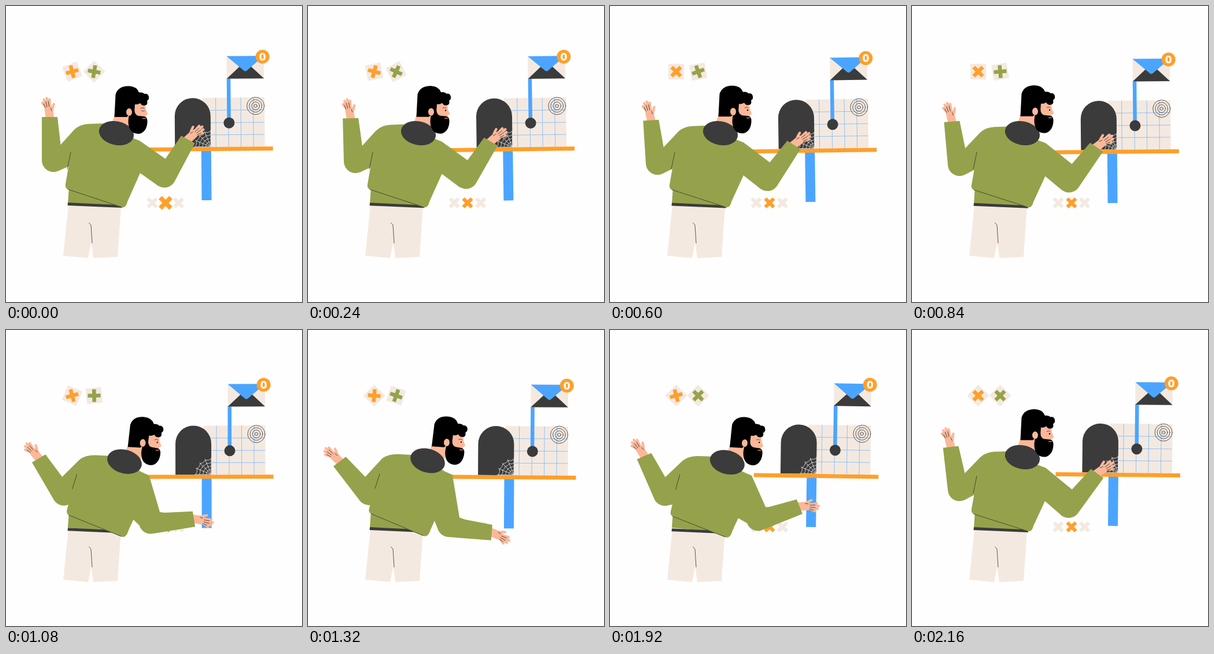
Write an HTML page that moves like this. It is 512 by 512 pixels and loops after 2280 ms.

```html
<!DOCTYPE html>
<html lang="en">
<head>
<meta charset="utf-8">
<title>Empty mailbox</title>
<style>
  html, body { margin: 0; width: 100%; height: 100%; overflow: hidden; background: #fefefe; }
  svg { display: block; width: 100vw; height: 100vh; }
  .green { fill: #95a24b; }
  .dark { fill: #3b3b3b; }
  .beige { fill: #f4e9e0; }
  .blue { fill: #4ba5ff; }
  .orange { fill: #ff9f2b; }
  .skin { fill: #fbb899; }
  .finger { stroke: #fbb899; stroke-width: 4.3; stroke-linecap: round; fill: none; }
  .ink { stroke: #333; stroke-width: .8; fill: none; stroke-linecap: round; }
  .web { stroke: #eee; stroke-width: .8; fill: none; }
  .grid { stroke: #86bff8; stroke-width: .9; fill: none; }
  .badge { font: bold 17px Inter, "Liberation Sans", sans-serif; fill: #fff; stroke: #fff; stroke-width: .7; text-anchor: middle; }
</style>
</head>
<body>
<svg viewBox="0 0 512 512" xmlns="http://www.w3.org/2000/svg">
  <defs>
    <path id="cross" d="M-11-3.3h7.7v-7.7h6.6v7.7H11v6.6H3.3V11h-6.6V3.3H-11z"/>
    <rect id="tile" class="beige" x="-13.5" y="-13.5" width="27" height="27"/>
    <g id="hand">
      <path class="skin" d="M-7 4L-7-12Q-7-19-4-22L4-21Q8-17 7.500-9L7.500 4z"/>
      <path class="finger" d="M-4-17L-9-26M-3-19L-5.500-31M0-20L-.5-33M3-19L4-30M5-10Q8-15 10-21"/>
      <path class="ink" d="M-5-17L-7-24M-2-18L-3-27M1.500-18L1.500-27M5-10L4-15"/>
    </g>
    <path id="forearm" class="green" d="M-20 0V-75H7L12.500-27L20 0A20 20 0 0 1-20 0z"/>
  </defs>

  <g transform="translate(114.500 113.500)">
    <use id="tileL" href="#tile"/><use id="crossL" href="#cross" class="orange"/>
  </g>
  <g transform="translate(152.500 113.500)">
    <use id="tileR" href="#tile"/><use id="crossR" href="#cross" class="green"/>
  </g>

  <use href="#cross" class="beige" transform="translate(253 340.500) rotate(45) scale(.95)"/>
  <use href="#cross" class="beige" transform="translate(298.500 340.500) rotate(45) scale(.95)"/>
  <use id="pulse" href="#cross" class="orange"/>

  <g id="mailbox">
    <rect class="blue" x="338.500" y="257" width="17" height="86"/>
    <rect class="beige" x="341" y="166" width="107.500" height="85"/>
    <path class="grid" d="M364 166V251M386 166V251M407.500 166V251M429 166V251M345 187.500H448M345 209H448M345 230H448"/>
    <path class="dark" d="M293 251V197A31 31 0 0 1 355 197V251z"/>
    <path class="web" id="web"/>
    <rect class="orange" x="247" y="251" width="215.500" height="7"/>
    <g class="ink" id="rings"></g>
    <rect class="blue" x="383.500" y="132" width="6.500" height="72"/>
    <circle class="dark" cx="387" cy="209.500" r="9.500"/>
    <rect class="beige" x="383.500" y="94" width="64.500" height="39"/>
    <path class="dark" d="M383.500 133L415.800 103L448 133z"/>
    <path class="blue" d="M383.500 94H448L418 119.500Q415.800 121 413.500 119.500z"/>
    <circle class="orange" cx="445.700" cy="95.500" r="12"/>
    <text class="badge" x="445.700" y="101.700">0</text>
  </g>

  <path class="beige" d="M108 344L199 347L193 434L151 436L147.500 409L142 436L99 432z"/>
  <path class="ink" d="M143.500 375L147 379L149 410"/>
  <path id="shirt" class="green"/>
  <path id="band" class="dark"/>
  <use id="handL" href="#hand"/>
  <use id="foreL" href="#forearm"/>
  <path id="upperL" class="green"/>
  <use id="handR" href="#hand"/>
  <use id="foreR" href="#forearm"/>
  <path id="upperR" class="green"/>
  <path id="torso" class="green"/>
  <path id="seams" class="ink"/>

  <path id="neck" class="skin" d="M188 188L182 206Q194 214 212 211L212 186z"/>
  <ellipse id="collar" class="dark" rx="30.500" ry="20.500"/>
  <g id="head">
    <path class="skin" d="M208 165L240 164L242 179L245 186Q245 189 242 189L240 200L212 200z"/>
    <path d="M187.500 192L189.500 153Q194 138 213 138.500Q226 139 230 149.500Q238 149 239 152Q246 151 247 157Q248 162 244 164Q246 171 240 172Q235 173 232 168Q228 171 223 170L222 184L216 186L209 192z"/>
    <path d="M213 186L222 180Q223 189 229 190L239 191Q244 192 244.500 198C245 213 237 221.500 228 221C217 220.500 211 212 211.500 198z"/>
    <ellipse class="skin" cx="213" cy="183.500" rx="5" ry="6.500"/>
    <path class="ink" d="M233 177Q236 174.500 239 177"/>
    <path d="M236 194.500H242" stroke="#e0765a" stroke-width="1.500"/>
    <circle id="eye" cx="238" cy="181" r="1.200"/>
    <path id="lid" class="ink" d="M234 181Q237 183 240 181.500"/>
  </g>
</svg>
<script>
const STEP = 120, STEPS = 19;
const el = id => document.getElementById(id);
const set = (id, name, value) => el(id).setAttribute(name, value);
const lerp = (a, b, u) => a + (b - a) * u;
const mix = (a, b, u) => a.map((v, i) => lerp(v, b[i], u));
const ramp = (k, from, to) => Math.min(1, Math.max(0, (k - from) / (to - from)));
const smooth = (k, from, to) => { const u = ramp(k, from, to); return u * u * (3 - 2 * u); };
const easeOut = u => 1 - (1 - u) ** 3;
const wave = (k, peak) => Math.cos(2 * Math.PI * (k - peak) / 23);

function place([x, y, deg], px, py) {
  const a = deg * Math.PI / 180, c = Math.cos(a), s = Math.sin(a);
  return [x + px * c - py * s, y + px * s + py * c];
}

function drawMailbox(k) {
  const sway = wave(k, 15), rise = -3.4 + 3.7 * wave(k, 11.6);
  set('mailbox', 'transform', `translate(${.25 + 1.65 * sway} ${rise}) rotate(${.83 * sway} 355 254.5)`);
}

function drawIcons(k) {
  const spin = (id, deg) => set(id, 'transform', `rotate(${deg})`);
  spin('tileL', -22 + 22 * smooth(k, 0, 4) + 45 * smooth(k, 7, 11));
  spin('crossL', -15 + 60 * smooth(k, 0, 4) + 55 * Math.sin(Math.PI * ramp(k, 7, 18)));
  spin('tileR', 45 + 35 * smooth(k, 0, 4) + 55 * smooth(k, 8, 14));
  spin('crossR', 10 + 75 * smooth(k, 0, 7) + 50 * smooth(k, 8, 14));
  set('pulse', 'transform', `translate(276 340.5) rotate(45) scale(${1.18 - .23 * ramp(k, 0, 2)})`);
}

// dir 1 is the left arm, -1 its mirror image
function drawArm(side, dir, pose, bend, innerY, root, tangent) {
  const [x, y, angle] = pose;
  set('fore' + side, 'transform', `translate(${x} ${y}) rotate(${angle}) scale(${dir} 1)`);
  set('hand' + side, 'transform', `translate(${place(pose, -6.5 * dir, -75)}) rotate(${angle + bend}) scale(${dir} 1)`);
  const outline = [place(pose, 12.5 * dir, innerY), ...root, [x + tangent[0], y + tangent[1]], [x, y]];
  set('upper' + side, 'd', 'M' + outline.join(' ') + 'z');
}

function drawMan(k) {
  const lean = easeOut(ramp(k, 7, 11)) * (1 - smooth(k, 15, 18));
  const swing = lean * lean;
  const slump = ramp(k, 0, 9);
  const dip = 6 * Math.sin(Math.PI * lean);

  // The torso bends more the higher and the further right a point lies.
  const bend = (x, y) => {
    const h = (347 - y) / 140, w = (x - 105) / 125;
    return [x + lean * h * (10 + 13 * w),
            y + lean * (8 * h + 12 * w - 1) + 6.5 * slump * (1 - lean) * h + dip];
  };
  const warp = d => d.replace(/([\d.]+) ([\d.]+)/g, (_, x, y) => bend(+x, +y).map(v => v.toFixed(1)).join(' '));

  set('torso', 'd', warp('M118 214Q127 205 142 204L170 203L218 228L231 233L209 342Q206 350 199 348L107 317Q102 315 103 308L112 255z'));
  const fold = mix([112, 253, 106, 282], [124, 249, 116, 274], lean);
  set('seams', 'd', warp('M107 317L199 347.5') + `M${fold.slice(0, 2)}L${fold.slice(2)}`);

  const hem = 201 - 4 * lean, sag = dip / 2 + slump;
  set('shirt', 'd', `M109 312L107 342L${hem} ${347 + sag}L203 335z`);
  set('band', 'd', `M107 ${340 + sag}L${hem} ${344.5 + sag}V${349 + sag}L106.5 ${345 + sag}z`);

  const armL = mix([82, 267 + 9 * slump, -6.5 * slump], [105.5, 283, -37.5], swing);
  const armR = mix([274 - 3 * slump, 294 + 11 * slump, 28 + 8 * slump], [243.5, 338, 94.5], swing);
  armL[1] += dip;
  armR[1] += dip;
  drawArm('L', 1, armL, -8, -27, [bend(118, 214), [125, lerp(270 + 6 * slump, 302, lean) + dip]], [8, 18.5]);
  const underarm = [lerp(232 - 2 * slump, 219, lean), lerp(289 + 7 * slump, 330, lean) + dip];
  drawArm('R', -1, armR, 19, lerp(-27, -18, lean),
    [bend(231, 233), bend(200, 250), bend(208, 343), underarm], mix([-11, 17], [-20, 4], lean));

  const headY = 10.5 * lean - 1.5 * slump * (1 - lean) + dip;
  for (const id of ['neck', 'head']) {
    set(id, 'transform', `translate(${25.5 * lean} ${headY}) rotate(${4 * lean} 205 205)`);
  }
  set('collar', 'transform', `translate(${191 + 16 * lean} ${220 + 6 * lean + dip}) rotate(${12 + 4 * lean})`);
  set('eye', 'opacity', k < 2 ? 0 : 1);
  set('lid', 'opacity', k < 2 ? 1 : 0);
}

function buildWeb() {
  const spoke = (r, i) => place([355, 250.5, 22.5 * i], -r, 0);
  let d = '';
  for (let i = 0; i < 5; i++) d += `M355 250.5L${spoke(29, i)}`;
  for (let r = 9; r < 28; r += 6) {
    for (let i = 0; i < 4; i++) d += `M${spoke(r, i)}Q${spoke(r * .88, i + .5)} ${spoke(r, i + 1)}`;
  }
  set('web', 'd', d);
}

function buildRings() {
  for (let r = 2.7; r < 16; r += 4.1) {
    el('rings').innerHTML += `<circle cx="433" cy="180.5" r="${r}"/>`;
  }
}

buildWeb();
buildRings();
const start = performance.now();
function tick() {
  const k = Math.floor((performance.now() - start) / STEP) % STEPS;
  drawMailbox(k);
  drawIcons(k);
  drawMan(k);
  requestAnimationFrame(tick);
}
tick();
</script>
</body>
</html>
```
